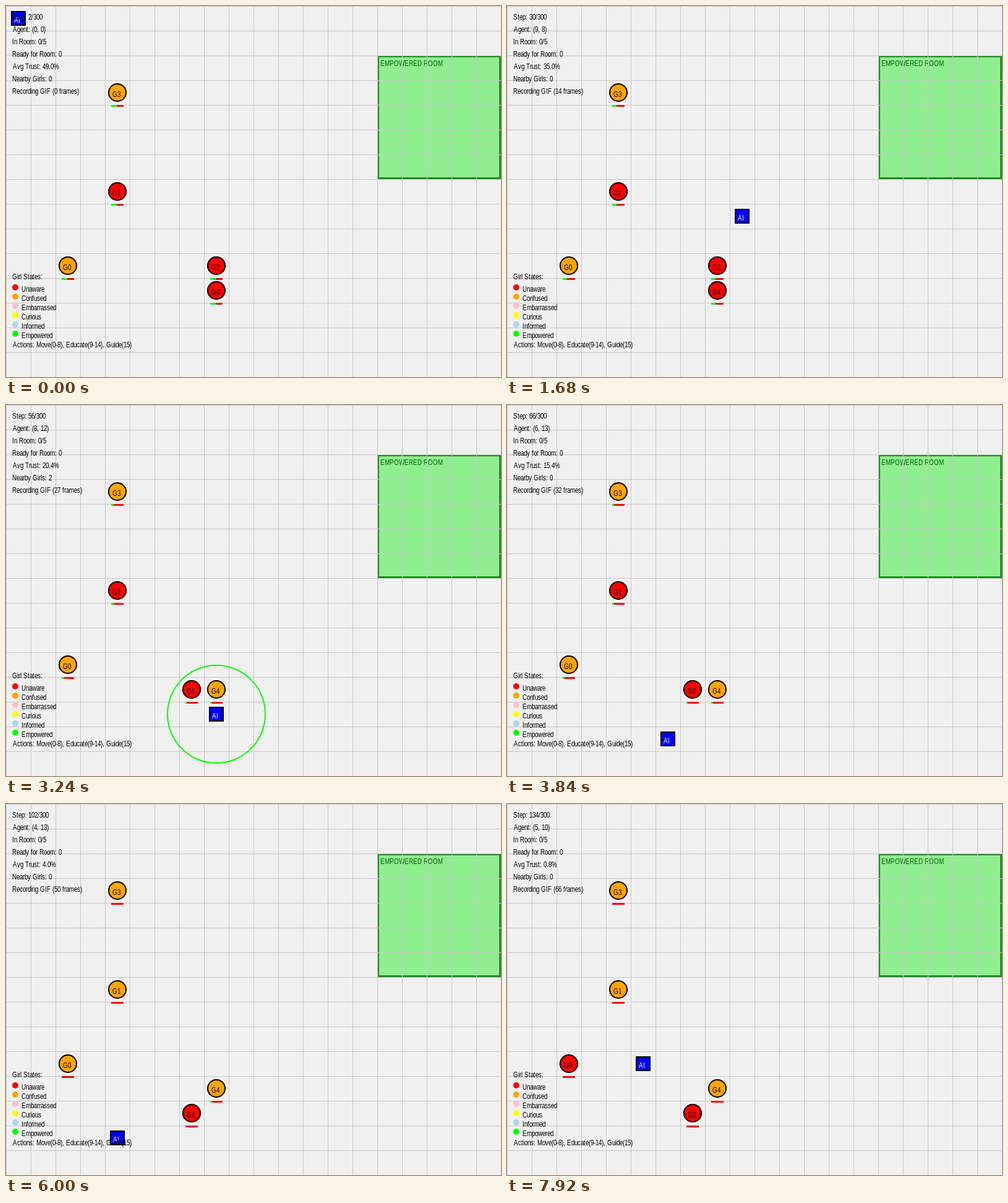
Recreate the animation shown at these times as an HTML page with a canvas. Size 800 px wide and 600 px high, loop 8000 ms.

```html
<!DOCTYPE html>
<html lang="en">
<head>
<meta charset="utf-8">
<title>Empowered Room</title>
<style>
  html, body { margin: 0; width: 100%; height: 100%; overflow: hidden; background: #f0f0f0; }
  canvas { display: block; }
</style>
</head>
<body>
<canvas id="stage" width="800" height="600"></canvas>
<script>
const ctx = document.getElementById('stage').getContext('2d');
const LOOP = 8000, TICK = 120, CELL = 40;
const RED = '#ff0000', ORANGE = '#ffa500', GREEN = '#00ff00';

const LEGEND = [
  ['Unaware', RED], ['Confused', ORANGE], ['Embarrassed', '#ffc0cb'],
  ['Curious', '#ffff00'], ['Informed', '#add8e6'], ['Empowered', GREEN]
];

// Agent waypoints: [tick, column, row]
const PATH = [
  [0, 0, 0], [8, 7, 4], [11, 9, 6], [14, 9, 8], [17, 8, 9], [18, 7, 10],
  [19, 7, 11], [21, 8, 12], [29, 8, 12], [32, 6, 13], [35, 8, 12],
  [37, 9, 12], [38, 9, 12], [42, 5, 14], [45, 5, 14], [49, 4, 13],
  [53, 2, 11], [56, 3, 13], [57, 2, 11], [58, 3, 10], [60, 3, 10], [66, 5, 10]
];

// Each track is a list of [tick, value...] that holds until the next entry.
const GIRLS = [
  { cell: [[0, 2, 10]], color: [[0, ORANGE], [62, RED]], bonus: [[0, 0]] },
  { cell: [[0, 4, 7]], color: [[0, RED], [38, ORANGE]], bonus: [[0, 0]] },
  { cell: [[0, 8, 10], [27, 7, 11], [41, 8, 12], [46, 7, 12]],
    color: [[0, RED], [37, ORANGE], [46, RED]],
    bonus: [[0, 0], [20, -0.005], [27, -0.06]] },
  { cell: [[0, 4, 3]], color: [[0, ORANGE]], bonus: [[0, 0]] },
  { cell: [[0, 8, 11]], color: [[0, RED], [25, ORANGE]],
    bonus: [[0, 0], [20, -0.02], [37, 0.21]] }
];

const held = (track, tick) => track.filter(entry => entry[0] <= tick).pop().slice(1);
const center = cell => cell * CELL + CELL / 2;

function agentCell(tick) {
  const next = PATH.findIndex(point => point[0] >= tick);
  if (next < 1) return PATH[0].slice(1);
  const [t0, x0, y0] = PATH[next - 1], [t1, x1, y1] = PATH[next];
  const p = (tick - t0) / (t1 - t0);
  return [Math.round(x0 + (x1 - x0) * p), Math.round(y0 + (y1 - y0) * p)];
}

// Condensed 12px face whose glyphs advance by whole pixels.
const FACE = '"Liberation Sans", Arial, sans-serif';
const SIZE = 12, CONDENSED = 0.82;
const advances = {};

function advance(char) {
  if (!(char in advances)) {
    ctx.font = `100px ${FACE}`;
    advances[char] = Math.round(ctx.measureText(char).width / 100 * SIZE * CONDENSED);
  }
  return advances[char];
}

function text(string, x, top, color = '#000') {
  if (string[0] === 'A') x++;
  ctx.fillStyle = color;
  for (const char of string) {
    const step = advance(char);
    ctx.font = `${SIZE}px ${FACE}`;
    ctx.save();
    ctx.translate(x, top + 12);
    ctx.scale(CONDENSED, 1);
    ctx.fillText(char, 0, 0);
    ctx.restore();
    x += step;
  }
}

function box(x, y, w, h, color) {
  ctx.fillStyle = color;
  ctx.fillRect(x, y, w, h);
}

function disc(x, y, r, color) {
  ctx.fillStyle = color;
  ctx.beginPath();
  ctx.arc(x, y, r, 0, Math.PI * 2);
  ctx.fill();
}

function ring(x, y, r, color) {
  ctx.strokeStyle = color;
  ctx.lineWidth = 2;
  ctx.beginPath();
  ctx.arc(x, y, r - 1, 0, Math.PI * 2);
  ctx.stroke();
}

function drawBoard() {
  box(0, 0, 800, 600, '#f0f0f0');
  box(600, 80, 200, 200, '#228b22');
  box(603, 83, 194, 194, '#90ee90');
  text('EMPOWERED ROOM', 605, 85, '#006400');
  for (let x = 0; x < 800; x += CELL) box(x, 0, 1, 600, '#c8c8c8');
  for (let y = 0; y < 600; y += CELL) box(0, y, 800, 1, '#c8c8c8');
}

function drawGirl(girl, index) {
  const x = center(girl.col), y = center(girl.row);
  disc(x, y, 15, girl.color);
  ring(x, y, 15, '#000');
  text('G' + index, x - 8, y - 5);
  box(x - 10, y + 20, 20, 3, RED);
  box(x - 10, y + 20, Math.floor(girl.trust * 20), 3, GREEN);
}

function drawAgent(col, row, nearby) {
  const x = center(col), y = center(row);
  if (nearby) ring(x, y, 80, GREEN);
  box(x - 12, y - 12, 24, 24, '#000');
  box(x - 10, y - 10, 20, 20, '#0000ff');
  text('AI', x - 8, y - 5, '#fff');
}

function drawPanel(lines) {
  lines.forEach((line, i) => text(line, 10, 10 + 20 * i));
  text('Girl States:', 10, 430);
  LEGEND.forEach(([label, color], i) => {
    disc(15, 455 + 15 * i, 5, color);
    text(label, 25, 450 + 15 * i);
  });
  text('Actions: Move(0-8), Educate(9-14), Guide(15)', 10, 540);
}

function draw(tick) {
  const step = 2 + 2 * tick;
  const [col, row] = agentCell(tick);
  const girls = GIRLS.map(girl => {
    const [gc, gr] = held(girl.cell, tick);
    return {
      col: gc, row: gr,
      color: held(girl.color, tick)[0],
      trust: Math.max(0, 0.5 - 0.005 * step + held(girl.bonus, tick)[0])
    };
  });
  const nearby = girls.filter(g => Math.max(Math.abs(g.col - col), Math.abs(g.row - row)) <= 1).length;
  const average = girls.reduce((sum, g) => sum + g.trust, 0) / girls.length;

  drawBoard();
  girls.forEach(drawGirl);
  drawAgent(col, row, nearby);
  drawPanel([
    `Step: ${step}/300`,
    `Agent: (${col}, ${row})`,
    'In Room: 0/5',
    'Ready for Room: 0',
    `Avg Trust: ${(average * 100).toFixed(1)}%`,
    `Nearby Girls: ${nearby}`,
    `Recording GIF (${tick} frames)`
  ]);
}

const start = performance.now();
function play(now) {
  draw(Math.floor(Math.max(0, now - start) % LOOP / TICK));
  requestAnimationFrame(play);
}
play(start);
</script>
</body>
</html>
```
